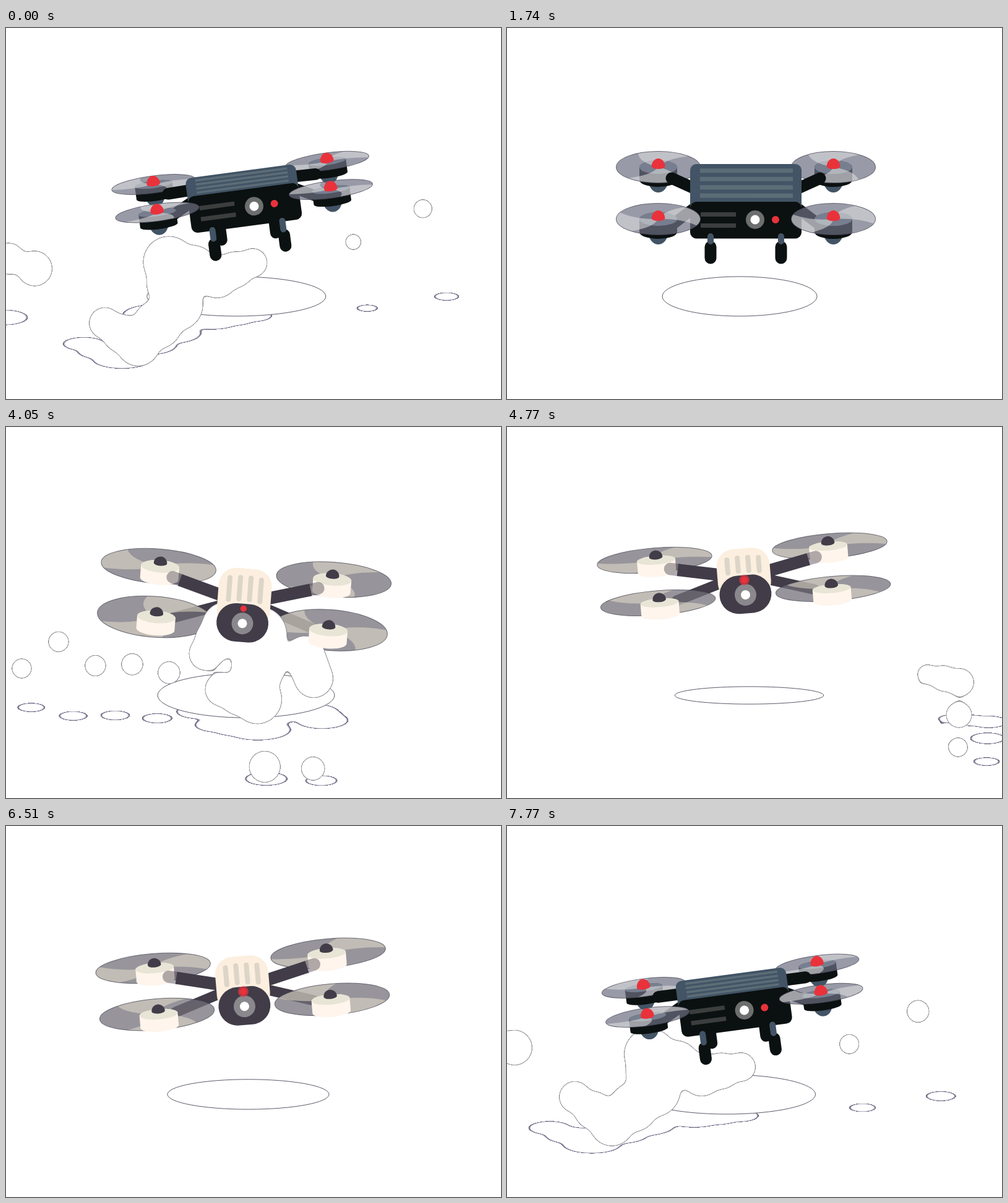
Recreate the animation shown at these times as an HTML page with a canvas. Size 800 px wide and 600 px high, loop 7800 ms.

```html
<!DOCTYPE html>
<html lang="en">
<head>
<meta charset="utf-8">
<title>Drones</title>
<style>
html, body { margin: 0; width: 100%; height: 100%; overflow: hidden; background: #fff; }
svg, canvas { position: absolute; left: 0; top: 0; width: 800px; height: 600px; }
</style>
</head>
<body>
<svg viewBox="0 0 800 600">
  <defs>
    <filter id="flatGoo" filterUnits="userSpaceOnUse" x="-60" y="0" width="920" height="600" color-interpolation-filters="sRGB">
      <feGaussianBlur stdDeviation="7 2.5"/>
      <feColorMatrix values="0 0 0 3.2 -1.03  0 0 0 3.2 -1.05  0 0 0 3.2 -.97  0 0 0 50 -20"/>
    </filter>
    <clipPath id="floor"><path d="M-200-200H1000V592H-200z"/></clipPath>
  </defs>
  <g filter="url(#flatGoo)"><g id="shades" clip-path="url(#floor)"></g></g>
  <ellipse id="shadow" cy="434" fill="#fff" stroke="#5c5a6a"/>
</svg>
<canvas id="low" width="800" height="600"></canvas>
<svg viewBox="0 0 800 600">
  <defs>
    <filter id="goo" filterUnits="userSpaceOnUse" x="-60" y="0" width="920" height="600" color-interpolation-filters="sRGB">
      <feGaussianBlur stdDeviation="7"/>
      <feColorMatrix values="0 0 0 6.4 -2.2  0 0 0 6.4 -2.2  0 0 0 6.4 -2.18  0 0 0 50 -20"/>
    </filter>
  </defs>
  <g filter="url(#goo)"><g id="puffs" clip-path="url(#floor)"></g></g>
</svg>
<canvas id="high" width="800" height="600"></canvas>
<script>
const LOOP = 7800;
const { PI, sin, cos, exp, abs, max, min, sqrt, floor } = Math;
const byId = id => document.getElementById(id);
const low = byId('low').getContext('2d');   // rotors that smoke may cover
const high = byId('high').getContext('2d');
let c = high;

const lerp = (a, b, u) => a + (b - a) * u;
const noise = n => { const v = sin(n * 12.9898) * 43758.5453; return v - floor(v); };
const swing = (t, peak, period) => cos(2 * PI * (t - peak) / period);

// Puffs spread evenly along a path of key points.
function chain(points, n, r0, r1, bulge = 0, jitter = 0) {
  return Array.from({ length: n }, (_, i) => {
    const u = i / (n - 1), k = u * (points.length - 1);
    const j = min(floor(k), points.length - 2);
    const [a, b] = [points[j], points[j + 1]];
    return {
      u,
      x: lerp(a[0], b[0], k - j),
      y: lerp(a[1], b[1], k - j) + (noise(i + 1) - .5) * 2 * jitter,
      r: lerp(r0, r1, u) + bulge * sin(PI * u)
    };
  });
}

// Incoming trails slow down around time "at"; "tail" and "head" are the speeds of the chain's ends.
const trail = (at, tail, head, puffs) => ({ at, life: 22, tail, head, puffs });
// Bursts spread from below the drone and reach their places at time "at".
const burst = (at, span, life, lift, puffs) => ({ at, span, life, lift, puffs });

const drift = [.9, .35], slow = [.15, .05];
const plume = [
  ...chain([[512, 414], [534, 384], [605, 392], [606, 455], [562, 435]], 9, 28, 30, 6),
  ...chain([[672, 412], [736, 400], [742, 442], [806, 436]], 4, 30, 22)
];
const waves = [
  trail(0, [1.47, 1.15], [.6, -.3],
    chain([[158, 476], [212, 510], [275, 447], [262, 378], [340, 402], [398, 380]], 11, 25, 23, 18)),
  trail(0, [1, .9], [1, .9], chain([[3, 372], [45, 388]], 2, 25, 28)),
  trail(4050, drift, drift,
    chain([[322, 366], [355, 322], [408, 335], [405, 440], [348, 424]], 9, 27, 27, 17)),
  trail(4050, drift, drift, chain([[482, 370], [496, 406]], 3, 32, 31)),
  trail(4050, drift, drift, chain([[417, 549], [495, 552]], 2, 25, 19)),
  trail(4050, slow, slow, chain([[25, 365], [263, 400]], 5, 16, 18, 0, 30)),
  burst(3030, 480, 14, 0, plume),
  burst(7010, 450, 14, 45, plume),
  burst(7770, 1170, 5.7, 0, chain([[664, 300], [553, 353]], 2, 18, 16))
];

function add(parent, tag) {
  const el = document.createElementNS('http://www.w3.org/2000/svg', tag);
  byId(parent).appendChild(el);
  return el;
}
function set(el, attrs) {
  for (const k in attrs) el.setAttribute(k, attrs[k]);
}
const dots = waves.flatMap(wave => wave.puffs.map(puff => ({
  wave, puff, ball: add('puffs', 'circle'), shade: add('shades', 'ellipse')
})));

function place({ at, span, life, lift, tail, head }, { x, y, r, u }, now) {
  const t = (now - at + LOOP * 1.5) % LOOP - LOOP / 2;
  const late = max(0, t);
  if (late > r * life || t < -(span || 700)) return [0, 0, 0];
  const fade = sqrt(1 - late / (r * life));
  if (span) {
    const age = t / span + 1;
    const e = (1 - exp(-1.2 * age)) / (1 - exp(-1.2));
    return [lerp(400, x, e) + late * .2, lerp(415, y, e) - lift - late * .2, r * fade * min(1, age * 2)];
  }
  const s = 120 * (1 - exp(-t / 120));
  return [
    x + lerp(tail[0], head[0], u) * s + late * .3,
    y + lerp(tail[1], head[1], u) * s + late * .05,
    r * fade
  ];
}

function drawSmoke(now) {
  for (const { wave, puff, ball, shade } of dots) {
    let [x, y, r] = place(wave, puff, now);
    if (x < -150 || x > 950 || y < -100 || y > 750) r = 0;
    const d = y - 400;
    set(ball, { cx: x, cy: y, r });
    set(shade, {
      cx: x + (x - 400) * .14,
      cy: 472 + .35 * d + .002 * max(0, d) ** 2,
      rx: r * 1.35, ry: r * .43
    });
  }
}

function box(x, y, w, h, r, fill) {
  c.fillStyle = fill;
  c.beginPath();
  c.roundRect(x, y, w, h, r);
  c.fill();
}
function oval(x, y, rx, ry, fill) {
  c.fillStyle = fill;
  c.beginPath();
  c.ellipse(x, y, rx, ry, 0, 0, 2 * PI);
  c.fill();
}
function rod(x1, y1, x2, y2, width, color, cap = 'round') {
  c.strokeStyle = color;
  c.lineWidth = width;
  c.lineCap = cap;
  c.beginPath();
  c.moveTo(x1, y1);
  c.lineTo(x2, y2);
  c.stroke();
}
function dome(x, y, h, fill) {
  c.fillStyle = fill;
  c.beginPath();
  c.ellipse(x, y, 10.8, h, 0, PI, 2 * PI);
  c.ellipse(x, y, 10.8, 4, 0, 0, PI);
  c.fill();
}
function can(x, top, bottom, rx, ry, side, lid) {
  c.fillStyle = side;
  c.beginPath();
  c.ellipse(x, top, rx, ry, 0, PI, 2 * PI);
  c.ellipse(x, bottom, rx, ry, 0, 0, PI);
  c.fill();
  oval(x, top, rx, ry, lid);
}
function rotor(x, y, rx, ry, angle, base, blade) {
  oval(x, y, rx, ry, base);
  c.save();
  c.translate(x, y);
  c.scale(rx, ry);
  c.fillStyle = blade;
  for (const a of [angle, angle + PI]) {
    c.beginPath();
    c.moveTo(0, 0);
    c.quadraticCurveTo(.55 * cos(a - .5), .55 * sin(a - .5), cos(a), sin(a));
    c.arc(0, 0, 1, a, a + 1.3);
    c.quadraticCurveTo(.55 * cos(a + .8), .55 * sin(a + .8), 0, 0);
    c.fill();
  }
  c.restore();
  c.strokeStyle = 'rgba(70,70,85,.75)';
  c.lineWidth = 1;
  c.beginPath();
  c.ellipse(x, y, rx, ry, 0, 0, 2 * PI);
  c.stroke();
}
function shadow(cx, rx, ry) {
  set(byId('shadow'), { cx, rx, ry });
}

const black = '#0b1010', steel = '#425465', red = '#e9323b';
const ink = '#413c48', cream = '#fcefdf';

const dark = {
  arrive: 39, ease: 233, leave: 2500, x: 386,
  roll: t => 7.6 * swing(t, 2092, 1407),
  pitch: t => .76 + .24 * swing(t, 1740, 1105),
  height: p => 281 - 47 * (1 - p),
  cast: (x, p) => shadow(x - 10, 125 + (1 - p) * 43, 32),
  draw(p, t) {
    const back = 6 - 63 * p, front = 6 + 21 * p, top = 68 * p - 7;
    const leg = 18 * (1 - p);
    const prop = (side, hub, turn) => {
      const x = side * 141.5;
      oval(x, hub + 15 + 10 * p, 15, 17, steel);
      can(x, hub + 1, hub + 22, 30.5, 11 * p, black, '#8fa3b0');
      rotor(x, hub + 1, 68, 25.5 * p, side * t / 64 + turn, 'rgba(110,112,130,.7)', 'rgba(225,226,226,.55)');
      dome(x, hub, 13, red);
    };
    for (const s of [-1, 1]) {
      prop(s, back, 1 + s);
      rod(s * 120, back + 19, s * 78, -19 * p, 19, black);
      rod(s * 78, 6, s * 116, front + 8, 18, black);
      rod(s * 44, 30, s * 44, 109 - 60 * p, 18, black);
    }
    box(-90, -top, 180, top + 20, 10, steel);
    for (let i = 0; i < 4; i++) box(-74, top * (.22 * i - .88), 150, top * .115, 0, '#5d6d77');
    box(-90, 0, 180, 59.5, 10, black);
    for (const y of [17, 35]) box(-73, y, 57, 7, 0, '#3c3e3e');
    oval(15, 29, 15, 15, '#6d6e6e');
    oval(15, 29, 7.5, 7.5, '#fff');
    oval(48, 29, 6, 6, red);
    for (const s of [-1, 1]) {
      rod(s * 57, 73 + leg, s * 57, 91 + leg, 19, black);
      rod(s * 57, 56 + leg * .3, s * 57, 64 + leg, 10, steel);
      prop(s, front, 2.2 + s);
    }
  }
};

const light = {
  arrive: 4195, ease: 900, leave: 6560, x: 385.5,
  roll: t => 6.5 * swing(t, 5646, 1407),
  pitch: t => .9 + .1 * swing(t, 4050, 1105),
  height: p => 316 - 283 * (1 - p),
  cast: (x, p) => shadow(x + 6, 117 + 144 * (p - .82), 11 + 140 * (p - .82)),
  drawLow(p, t) {
    const [mid, back, front] = this.levels(p);
    const spin = (side, hub, ry, turn) => rotor(side * 142, hub + 7, 93, ry,
      side * t / 70 + turn, 'rgba(115,113,120,.74)', 'rgba(230,222,205,.52)');
    for (const s of [-1, 1]) {
      spin(s, back, 28 * p * p, 2 + s);
      rod(s * 36, -27 * p, s * 112, front + 6, 17, ink);
      spin(s, front, 33 * p ** 3, .6 + s);
    }
  },
  draw(p, t) {
    const [mid, back, front] = this.levels(p);
    const top = 57 - 88 * (1 - p);
    const motor = (x, hub) => {
      can(x, hub + 7, hub + 27, 31, 10 * p * p, '#fff5ec', '#e8e5d6');
      dome(x, hub + 2, 11, ink);
    };
    for (const s of [-1, 1]) {
      motor(s * 139.5, back);
      const y = k => lerp(back + 23, mid + 5, k);
      rod(s * 118, y(0), s * 104, y(.17), 20, 'rgba(65,60,72,.42)');
      rod(s * 106, y(.15), s * 37, y(1), 20, ink, 'butt');
      motor(s * 139.5, front);
    }
    box(-43, -32 - top, 86, top + 40, 28, cream);
    for (const x of [-25.5, -8.5, 8.5, 25.5]) {
      box(x - 4, -22 - top + abs(x) * .1, 8, top - 14, 4, '#dcd5c8');
    }
    box(-42, -32, 84, 62, 31, ink);
    oval(0, 0, 17.5, 17.5, '#8a888d');
    oval(0, 0, 7.5, 7.5, '#fff');
    const glow = 5 + 3.5 * max(0, swing(t, 6510, 1860));
    oval(0, -24, glow, glow, 'rgba(233,50,59,.75)');
    oval(0, -24, 5, 5, red);
  },
  levels(p) {
    const mid = 2 - 50 * p;
    return [mid, mid - 41 * p, mid + 41 * p];
  }
};

// Glide in from the left, hover, then speed off to the right.
function fly(drone, t) {
  const away = max(0, t - drone.leave);
  if (t < drone.arrive - drone.ease || away > 380) return;
  const gap = 850 * max(0, (drone.arrive - t) / drone.ease) ** 3;
  const p = drone.pitch(t);
  const x = drone.x - gap + .0055 * away * away;
  const y = drone.height(p) + min(gap / 2, 40);
  const roll = drone.roll(t) + 10 * min(1, away / 150);
  drone.cast(x, p);
  const paint = (layer, part) => {
    c = layer;
    c.save();
    c.translate(x, y);
    c.rotate(roll * PI / 180);
    drone[part](p, t);
    c.restore();
  };
  if (drone.drawLow) paint(low, 'drawLow');
  paint(high, 'draw');
}

function frame(ms) {
  const t = ms % LOOP;
  low.clearRect(0, 0, 800, 600);
  high.clearRect(0, 0, 800, 600);
  shadow(-400, 0, 0);
  drawSmoke(t);
  fly(dark, t > 7200 ? t - LOOP : t);
  fly(light, t);
}

const start = performance.now();
(function tick() {
  frame(performance.now() - start);
  requestAnimationFrame(tick);
})();
</script>
</body>
</html>
```
